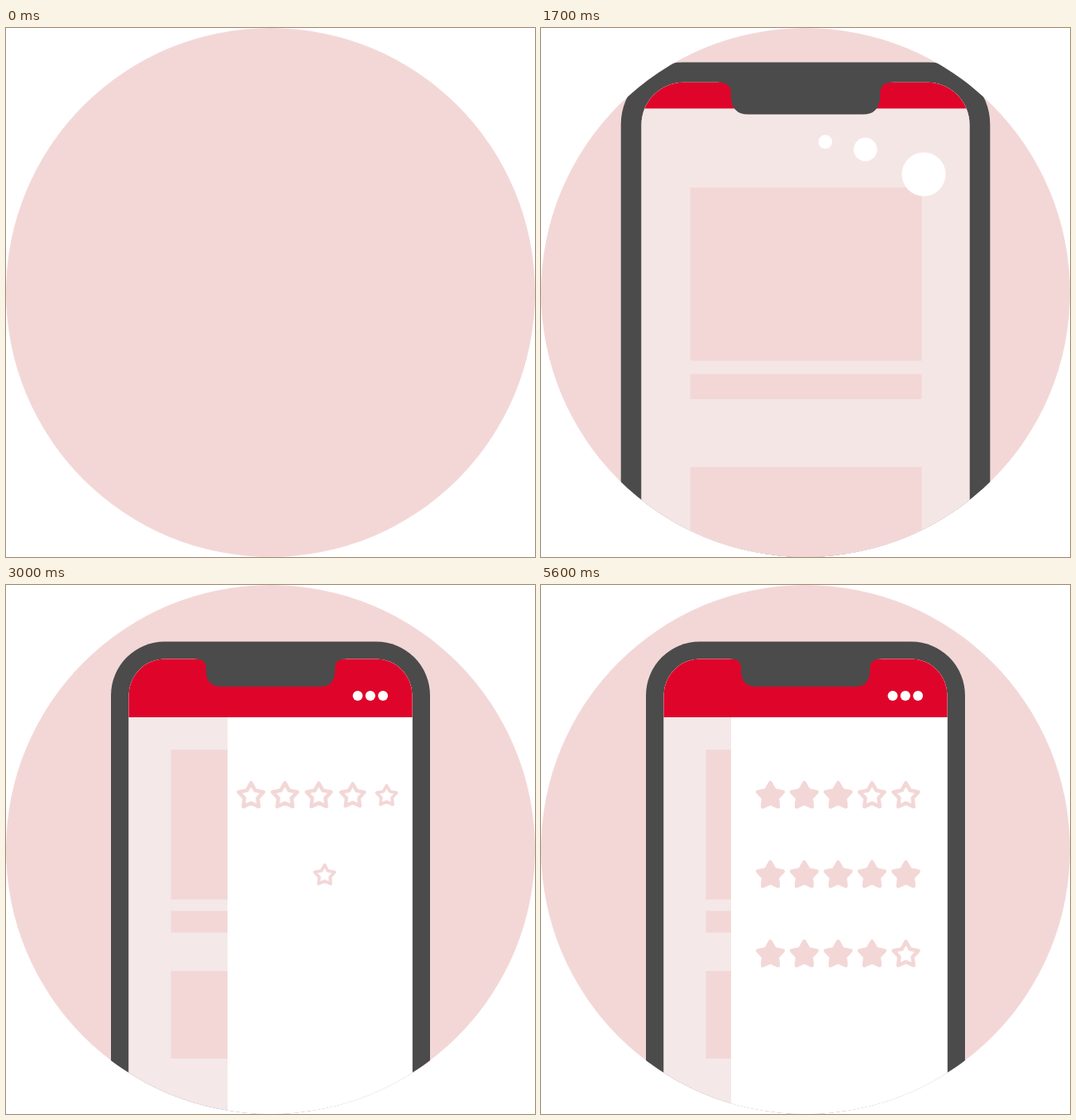
Write an HTML page that moves like this. It is 640x640 px and loops after 7.2 s.

```html
<!DOCTYPE html>
<html lang="en">
<head>
<meta charset="utf-8">
<title>Rating menu</title>
<style>
  html, body { margin: 0; width: 100%; height: 100%; overflow: hidden; background: #fff; }
  svg { display: block; width: 100%; height: 100%; }
</style>
</head>
<body>
<svg viewBox="0 0 640 640" xmlns="http://www.w3.org/2000/svg">
  <defs>
    <clipPath id="disc"><circle cx="320" cy="320" r="320"/></clipPath>
    <clipPath id="glass"><rect x="148.5" y="89.5" width="343" height="900" rx="44"/></clipPath>
    <clipPath id="sheetClip"><rect id="sheetEdge" y="160" width="343" height="500"/></clipPath>
  </defs>
  <g clip-path="url(#disc)">
    <rect width="640" height="640" fill="#f3d7d7"/>
    <g id="phone">
      <rect x="127" y="68.5" width="386" height="940" rx="65" fill="#4b4b4b"/>
      <g clip-path="url(#glass)">
        <rect x="148" y="89" width="344" height="900" fill="#f3d7d7"/>
        <rect id="page" x="148" y="89" width="344" fill="#f4e8e8"/>
        <rect id="veil" x="148" y="89" width="344" fill="#f3d7d7"/>
        <g fill="#f3d7d7">
          <rect x="199.5" y="199.3" width="242" height="181.2"/>
          <rect x="199.5" y="394.3" width="242" height="26.2"/>
          <rect id="lowCard" x="199.5" y="467" width="242" height="106"/>
        </g>
        <rect id="sheet" y="160" width="343" height="700" fill="#fff"/>
        <rect id="header" x="148" y="-240" width="344" height="400" fill="#df052a"/>
      </g>
      <path fill="#4b4b4b" d="M229 89.5V85H411V89.5H409Q398 90.5 398 101V105Q397 123 380 123H260Q243 123 242 105V101Q242 90.5 231 89.5Z"/>
    </g>
    <g id="rows" clip-path="url(#sheetClip)"></g>
    <g id="dots" fill="#fff"></g>
  </g>
</svg>
<script>
const NS = "http://www.w3.org/2000/svg";
const STEP = 100, STEPS = 72;
const PINK = "#f3d7d7";
const byId = id => document.getElementById(id);
const set = (el, attrs) => { for (const k in attrs) el.setAttribute(k, attrs[k]); };
const add = (parent, tag, attrs) => {
  const el = document.createElementNS(NS, tag);
  set(el, attrs);
  return parent.appendChild(el);
};
const mix = (a, b, p) => a + (b - a) * p;
// value of a key list at step i, nothing before it, last value after it
const at = (keys, i) => i < 0 ? 0 : keys[Math.min(i, keys.length - 1)];

const dotPop = [0.46, 1, 1.235, 1.09, 1];
const starPop = [0.65, 1.03, 1.15, 1.07, 1];
const flyX = [0, 0.11, 0.29, 0.48, 0.6, 0.68, 0.74, 1];
const flyY = [0, 0.011, 0.172, 0.769, 0.93, 0.98, 0.997, 1];
const flyR = [0, 0.01, 0.208, 0.573, 0.83, 0.95, 0.985, 1];
const hop = [12, 30, 14, 0];
const ratings = [3, 5, 4];

function starPath(R, r) {
  let d = "";
  for (let i = 0; i < 10; i++) {
    const a = i * Math.PI / 5, q = i % 2 ? r : R;
    d += (i ? "L" : "M") + (q * Math.sin(a)).toFixed(2) + " " + (-q * Math.cos(a)).toFixed(2);
  }
  return d + "Z";
}

const star = starPath(15.8, 8.5);
const dots = [0, 1, 2].map(() => add(byId("dots"), "circle", {}));
const stars = [];
ratings.forEach((score, row) => {
  for (let col = 0; col < 5; col++) {
    const look = { d: star, stroke: PINK, "stroke-width": 4.6, "stroke-linejoin": "round" };
    stars.push({
      row, col, score,
      line: add(byId("rows"), "path", { ...look, fill: "none" }),
      full: add(byId("rows"), "path", { ...look, fill: PINK })
    });
  }
});

function drawDots(n) {
  dots.forEach((dot, j) => {
    const k = Math.max(0, n - 12 - j);
    const lift = at(hop, n - 24 - j);
    set(dot, {
      cx: mix(170.5 + 149.5 * j, 425.5 + 15.3 * j, at(flyX, k)),
      cy: mix(320, 134, at(flyY, k)) - lift,
      r: mix(54, 6, at(flyR, k)) * at(dotPop, n - 2 - 2 * j)
    });
  });
}

function drawPhone(n) {
  const m = n - 15;
  const ease = m >= 7 ? 0 : Math.pow(0.411, m);
  const s = 1 + 0.93 * ease;
  const bottom = y => Math.max(0, (y - 240) / s + 240 - 89);
  set(byId("phone"), {
    visibility: m < 0 ? "hidden" : "visible",
    transform: `translate(320 240) scale(${s}) translate(-320 -240)`
  });
  set(byId("page"), { height: bottom(636) });
  set(byId("veil"), { height: bottom(628), opacity: Math.min(1, 0.82 * ease) });
  set(byId("header"), { y: -240 - 256 * ease });
  set(byId("lowCard"), { y: 467 + 145 * ease });
}

function drawSheet(n) {
  const shift = n >= 38 ? 0 : 38 * Math.pow(0.57, n - 30);
  const x = n < 27 ? 700 : 230 + shift;
  set(byId("sheet"), { x });
  set(byId("sheetEdge"), { x });
}

function drawStars(n) {
  for (const { row, col, score, line, full } of stars) {
    const m = n - 27 - 3 * row;
    const age = m - 0.75 * col;
    const slide = m >= 7 ? 0 : 108 * Math.pow(0.56, m);
    const place = k => `translate(${277.5 + 41 * col + slide} ${255.3 + 96 * row}) scale(${k})`;
    const fill = col < score ? at(starPop, n - 43 - 3 * row - col) : 0;
    set(line, { transform: place(1 - 0.2 * Math.pow(0.2, Math.max(0, age))), visibility: age < 0 ? "hidden" : "visible" });
    set(full, { transform: place(fill), visibility: fill ? "visible" : "hidden" });
  }
}

function draw(ms) {
  const n = Math.floor(ms / STEP) % STEPS;
  drawPhone(n);
  drawSheet(n);
  drawStars(n);
  drawDots(n);
}

const start = performance.now();
function tick() {
  draw(performance.now() - start);
  requestAnimationFrame(tick);
}
tick();
</script>
</body>
</html>
```
